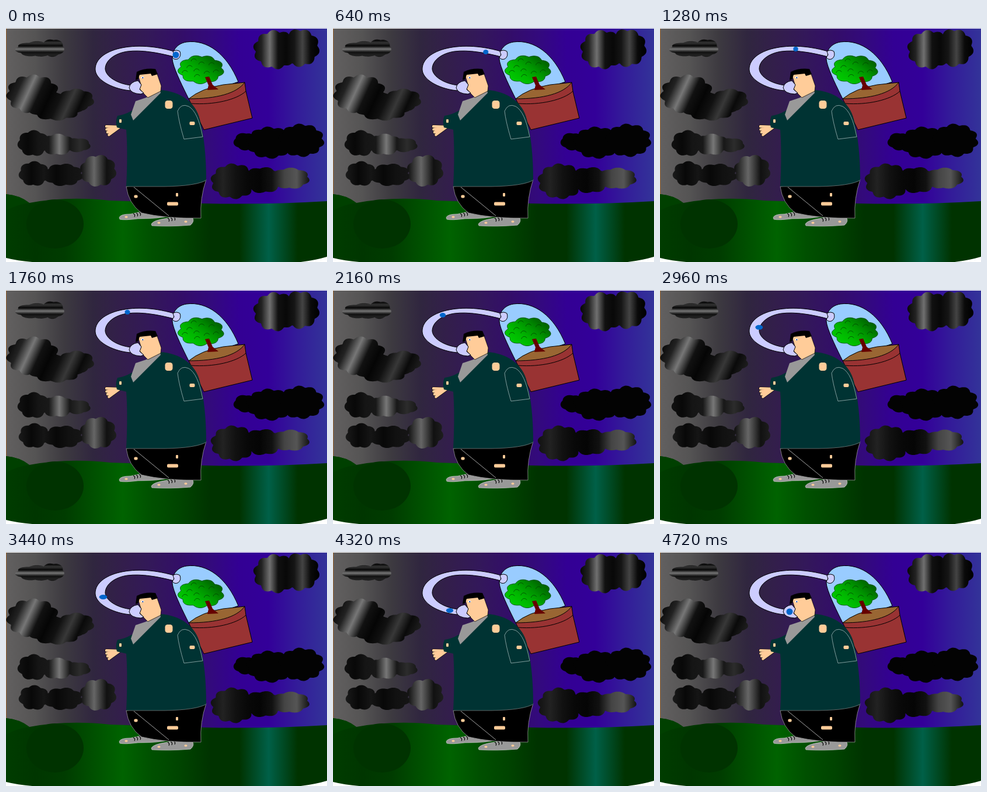
Recreate the animation shown at these times as an HTML page with a canvas. Size 550 by 400 pixels, loop 4.8 s.

```html
<!DOCTYPE html>
<html lang="en">
<head>
<meta charset="utf-8">
<title>Bottled air</title>
<style>
html, body { margin: 0; width: 100%; height: 100%; overflow: hidden; background: #fff; }
canvas { display: block; }
</style>
</head>
<body>
<canvas id="stage" width="550" height="400"></canvas>
<script>
const LOOP = 4800, STEP = 80, LAST = LOOP / STEP - 1;
const SKIN = '#ffcc99', LAVENDER = '#ccccff', CLOTH = '#003333', GREY = '#999999', POT = '#993333';
const stage = document.getElementById('stage').getContext('2d');
const scene = document.createElement('canvas');
scene.width = 550;
scene.height = 400;
const c = scene.getContext('2d');

function shape(d, fill, stroke, width = 1) {
  const path = new Path2D(d);
  if (fill) { c.fillStyle = fill; c.fill(path); }
  if (stroke) { c.strokeStyle = stroke; c.lineWidth = width; c.stroke(path); }
}

function oval(ctx, x, y, rx, ry, fill) {
  ctx.beginPath();
  ctx.ellipse(x, y, rx, ry, 0, 0, Math.PI * 2);
  ctx.fillStyle = fill;
  ctx.fill();
}

// Evenly spaced colours along a line.
function blend(x0, y0, x1, y1, colours) {
  const g = c.createLinearGradient(x0, y0, x1, y1);
  colours.split(' ').forEach((colour, i, all) => g.addColorStop(i / (all.length - 1), colour));
  return g;
}

// Ellipse with a scalloped rim; bumps grow in number with its size.
function puff(x, y, rx, ry) {
  const path = new Path2D();
  const bumps = Math.round((rx + ry) / 7);
  for (let i = 0; i < 120; i++) {
    const a = i / 120 * Math.PI * 2;
    const k = 0.89 + 0.13 * Math.abs(Math.sin(a * bumps / 2 + 0.6));
    path.lineTo(x + rx * k * Math.cos(a), y + ry * k * Math.sin(a));
  }
  path.closePath();
  return path;
}

function cloud(fill, ...puffs) {
  c.fillStyle = fill;
  for (const p of puffs) c.fill(puff(...p));
}

// Round-ended fingers fanned around a direction.
function hand(x, y, direction, spread, length, width) {
  c.lineCap = 'round';
  for (const [colour, extra] of [['#000', 1], [SKIN, 0]]) {
    c.strokeStyle = colour;
    c.lineWidth = width + extra;
    c.beginPath();
    for (let i = -1.5; i <= 1.5; i++) {
      const a = direction + i * spread;
      c.moveTo(x, y);
      c.lineTo(x + length * Math.cos(a), y + length * Math.sin(a));
    }
    c.stroke();
  }
  c.lineCap = 'butt';
}

function drawSky() {
  c.fillStyle = blend(0, 0, 550, 0,
    '#626060 #555454 #3d3a40 #30263f #331e4c #33185a #330e68 #330a7c #330094 #330099 #331c99 #333399');
  c.fillRect(0, 0, 550, 400);
  c.fillStyle = '#996633';
  c.fillRect(0, 0, 1, 285);
}

function drawGround() {
  shape('M0 284Q24 286 40 299Q105 287 178 295Q235 297 340 300Q450 302 550 296V400H0Z',
    blend(0, 0, 550, 0, '#003c00 #003600 #003c00 #005000 #006300 #005000 #004400 #003300 #003300 #006048 #003300 #003300'));
  shape('M0 284Q24 286 40 299Q18 302 0 312Z', '#004000');
  oval(c, 84, 335, 49, 42, '#003300');
  shape('M0 393Q20 398 45 400H0ZM550 391Q530 397 505 400H550Z', '#fff');
}

function drawClouds() {
  cloud(blend(0, 20, 0, 52, '#000 #333 #080808 #777 #111 #222 #000'), [52, 36, 36, 13], [80, 34, 20, 15]);
  cloud(blend(8, 90, 138, 150, '#0a0a0a #222 #777 #111 #050505 #111 #383838 #0a0a0a #1c1c1c'),
    [46, 113, 45, 33], [85, 134, 48, 24], [120, 123, 31, 19]);
  cloud(blend(20, 0, 145, 0, '#111 #080808 #151515 #181818 #777 #181818 #2c2c2c #161616'),
    [47, 197, 27, 22], [88, 199, 30, 18], [122, 200, 23, 12]);
  cloud(blend(22, 0, 194, 0, '#1a1a1a #080808 #151515 #080808 #111 #151515 #666 #111 #222'),
    [48, 249, 26, 21], [98, 251, 34, 19], [158, 244, 31, 27]);
  cloud(blend(424, 0, 536, 0, '#080808 #222 #707070 #111 #080808 #151515 #444 #0a0a0a #000'),
    [462, 37, 38, 33], [503, 34, 34, 32]);
  cloud('#030303', [410, 194, 20, 15], [452, 196, 40, 27], [506, 192, 39, 28]);
  cloud(blend(351, 0, 519, 0, '#111 #222 #111 #080808 #050505 #111 #444 #555 #151515'),
    [390, 262, 39, 30], [440, 260, 36, 22], [487, 257, 33, 18]);
}

function drawTree() {
  const canopy = puff(334, 71, 39, 24);
  c.fillStyle = blend(350, 48, 312, 95, '#006600 #009400 #00b800 #00cc00');
  c.fill(canopy);
  c.strokeStyle = '#004400';
  c.lineWidth = 0.8;
  c.stroke(canopy);
  for (let i = 1; i < 10; i++) {
    const r = Math.sqrt(i / 10), a = i * 2.4;
    c.beginPath();
    c.arc(334 + 31 * r * Math.cos(a), 71 + 18 * r * Math.sin(a), 5, 3.3, 5.8);
    c.stroke();
  }
  shape('M341 84L348 83L354 97L364 105L345 106L347 98Z', '#660000');
}

function drawJar() {
  shape('M313 121C304 103 290 75 286 59C282 43 290 27 309 24C345 19 379 45 398 92Z', '#99ccff', '#000');
  shape('M313 121L409 93L411 108L422 154L339 174Z', POT, '#000');
  shape('M313 121Q335 103 372 97L409 93C395 112 361 121 313 121Z', '#996633', '#000');
  shape('M317 129C355 132 395 123 411 108', null, '#000');
  drawTree();
}

function drawTube() {
  shape('M288 40C249 29 216 29 190 36C166 43 152 56 153 72C155 91 187 105 213 107L214 98' +
    'C190 95 171 83 170 70C170 55 187 43 208 40C232 37 260 42 287 49Z', LAVENDER, '#000');
  shape('M286 40Q292 36 298 40Q301 49 294 53Q288 55 285 50L288 46Z', LAVENDER, '#000');
}

function drawHead() {
  shape('M226 80L231 96L229 104L237 113L243 119L265 108L266 99L258 76L240 74Z', SKIN, '#000', 0.7);
  shape('M222 89L224 75Q238 68 256 70L260 79L250 82L248 78L229 80L226 88Z', '#000');
  oval(c, 234, 84.5, 2.6, 1.8, '#fff');
  oval(c, 234.3, 85, 1, 1.2, '#003399');
  shape('M226 90Q213 92 211 102Q213 112 231 113L236 111L229 105L232 97Z', LAVENDER, '#000');
}

function drawBody() {
  hand(195, 169, Math.PI - 0.3, 0.22, 23, 4.5);
  hand(320, 190, Math.PI / 2, 0.45, 18, 7);
  oval(c, 320, 191, 16, 8, SKIN);
  shape('M216 141Q202 149 191 150Q187 160 190 170L207 174L220 157Z', CLOTH);
  shape('M206 271L343 259Q332 291 334 325Q273 326 232 316Q210 300 206 271Z', '#000', '#aaa', 0.7);
  shape('M219 272L279 321', null, '#ccc', 0.8);
  shape('M264 106C299 108 326 128 332 156Q343 198 343 261Q326 270 272 271L206 271Q209 214 206 173L218 157Z', CLOTH);
  shape('M206 271L272 271Q326 270 343 260', null, '#777', 0.8);
  shape('M222 125L240 119L264 106L265 111L218 158L214 148Z', GREY);
  shape('M305 190Q296 160 294 142Q300 128 313 134Q329 143 337 186Z', CLOTH, '#b8c8c8', 0.7);
}

function drawShoes() {
  shape('M194 324Q196 318 214 318L232 314L279 321Q265 326 226 326Q203 329 195 327Z', GREY, '#ccc', 0.7);
  shape('M249 335Q253 328 278 325L290 322L320 325Q323 331 316 337Q281 340 250 338Z', GREY, '#ccc', 0.7);
  for (let i = 0; i < 3; i++) {
    for (const [x, y] of [[218, 317], [277, 325]]) {
      shape(`M${x + 5 * i} ${y - i}q4 2 2 6`, null, '#000', 1.1);
    }
  }
  for (const [x, y] of [[206, 323], [262, 333], [308, 331]]) oval(c, x, y, 2.6, 1.8, SKIN);
}

function drawPatches() {
  const patch = (x, y, w, h) => {
    c.fillStyle = SKIN;
    c.beginPath();
    c.roundRect(x - w / 2, y - h / 2, w, h, Math.min(w, h) / 3);
    c.fill();
  };
  patch(279, 131, 13, 14);
  patch(319, 163, 9, 6);
  patch(196, 159, 4, 6);
  patch(222.5, 288, 6, 5);
  patch(293, 285, 4, 6);
  patch(285.5, 300.5, 19, 6);
}

for (const draw of [drawSky, drawGround, drawClouds, drawJar, drawTube, drawShoes, drawBody, drawHead, drawPatches]) draw();
c.fillStyle = '#fff';
c.fillRect(0, 0, 550, 1);

// Key points of the bubble's way through the tube: step, x, y.
const route = [
  [0, 291, 46], [16, 232.5, 36], [21, 212, 36.8], [27, 188, 43],
  [33, 172, 55], [43, 166.5, 77], [54, 200, 100], [LAST, 222, 102]
];

function bubbleAt(step) {
  const next = Math.max(1, route.findIndex(p => p[0] >= step));
  const [t0, x0, y0] = route[next - 1], [t1, x1, y1] = route[next];
  const k = (step - t0) / (t1 - t0), u = step / LAST;
  const rx = 5.5 - 1.3 * Math.sin(u * Math.PI * 2);
  const ry = 4 + 1.6 * Math.abs(2 * u - 1) ** 20;
  return [x0 + (x1 - x0) * k, y0 + (y1 - y0) * k, rx, ry];
}

function render() {
  const step = Math.floor(performance.now() % LOOP / STEP);
  stage.drawImage(scene, 0, 0);
  oval(stage, ...bubbleAt(step), '#0066cc');
  requestAnimationFrame(render);
}
render();
</script>
</body>
</html>
```
